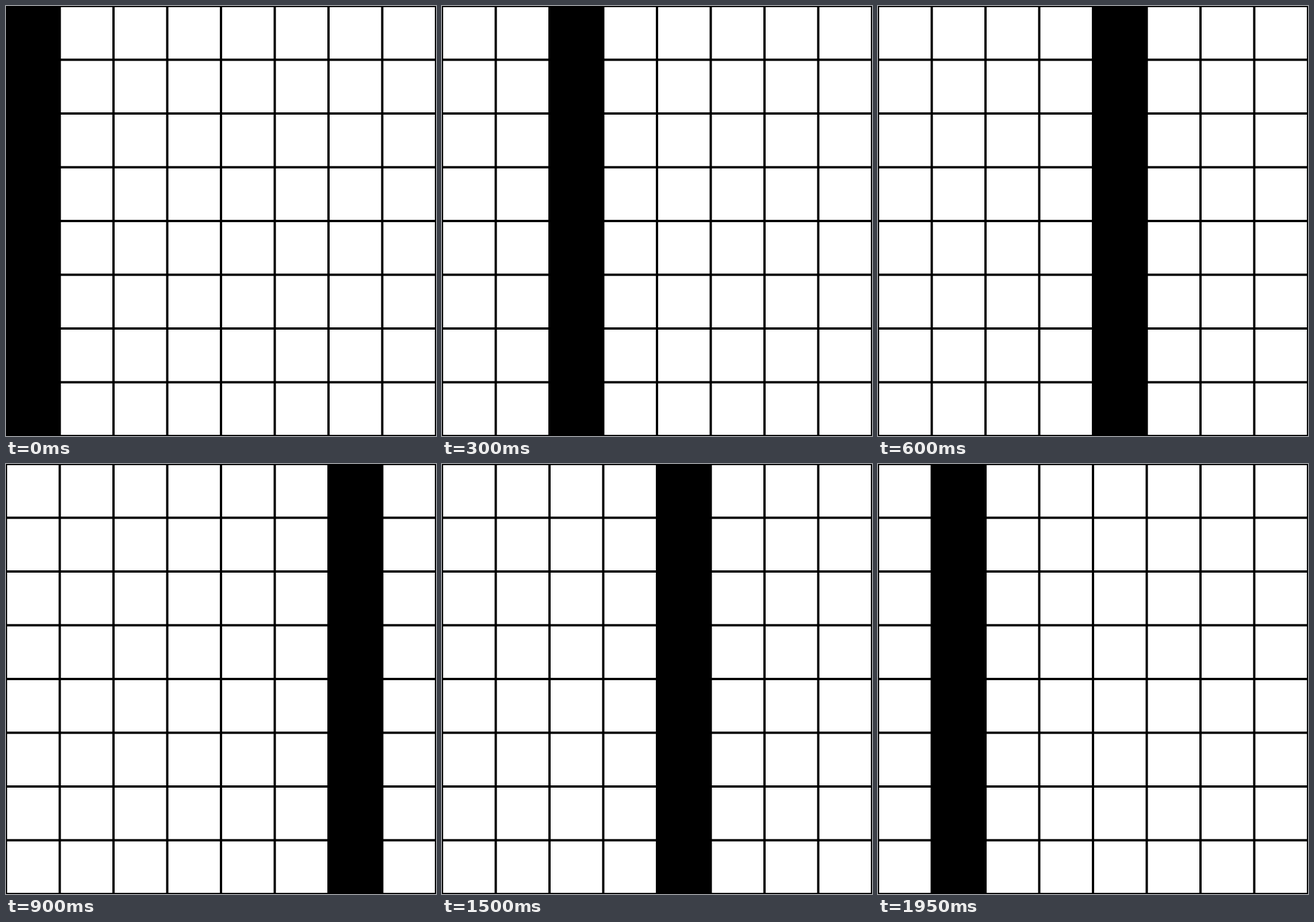
Animation of 748 by 748 pixels, one loop 2.1 s. Source, as an HTML page with a canvas:

```html
<!DOCTYPE html>
<html lang="en">
<head>
<meta charset="utf-8">
<title>Sweeping column</title>
<style>
  html, body { margin: 0; width: 100%; height: 100%; overflow: hidden; background: #fff; }
  canvas { display: block; width: 748px; height: 748px; }
</style>
</head>
<body>
<canvas id="stage" width="748" height="748"></canvas>
<script>
  const SIZE = 748, COUNT = 8, CELL = SIZE / COUNT, LINE = 4;
  const STEP = 150, LAST = COUNT - 1;
  const ctx = document.getElementById('stage').getContext('2d');
  let shown = -1;

  // The filled column bounces between both ends, one cell per step.
  function columnAt(time) {
    const step = Math.floor(time / STEP) % (2 * LAST);
    return LAST - Math.abs(LAST - step);
  }

  function draw(column) {
    ctx.fillStyle = '#fff';
    ctx.fillRect(0, 0, SIZE, SIZE);
    ctx.fillStyle = '#000';
    ctx.fillRect(column * CELL, 0, CELL, SIZE);

    ctx.lineWidth = LINE;
    ctx.beginPath();
    for (let i = 0; i <= COUNT; i++) {
      const p = i * CELL;
      ctx.moveTo(p, 0);
      ctx.lineTo(p, SIZE);
      ctx.moveTo(0, p);
      ctx.lineTo(SIZE, p);
    }
    ctx.stroke();
  }

  const start = performance.now();

  function tick() {
    const column = columnAt(performance.now() - start);
    if (column !== shown) draw(shown = column);
    requestAnimationFrame(tick);
  }
  tick();
</script>
</body>
</html>
```
